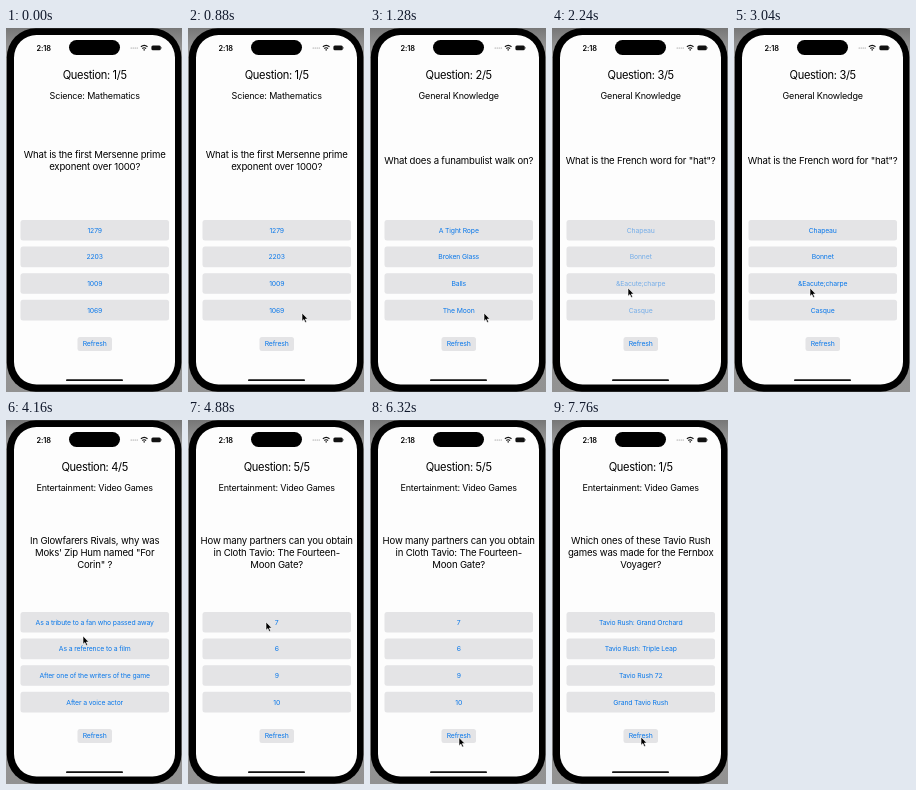
Animation, 176 px wide and 364 px high, one loop 8 s. Source, as an HTML page:

```html
<!DOCTYPE html>
<html lang="en">
<head>
<meta charset="utf-8">
<title>Quiz</title>
<style>
  html, body { margin: 0; width: 100%; height: 100%; overflow: hidden; background: #8e8e8e; }
  svg { display: block; width: 176px; height: 364px; }
  text { font-family: Inter, Roboto, sans-serif; text-anchor: middle; letter-spacing: -.02em; fill: #000; }
  .title { font-size: 11.1px; letter-spacing: -.03em; }
  .topic { font-size: 9px; }
  .ask { font-size: 9.6px; }
  .label { font-size: 6.85px; fill: #0a78ea; }
  .clock { font-size: 7.4px; font-weight: 600; }
  .key { fill: #e4e4e6; }
</style>
</head>
<body>
<svg id="stage" viewBox="0 0 176 364">
  <defs>
    <linearGradient id="wall" x2="0" y2="1">
      <stop offset="0" stop-color="#777"/>
      <stop offset=".08" stop-color="#a2a2a2"/>
      <stop offset="1" stop-color="#929292"/>
    </linearGradient>
  </defs>
  <rect width="176" height="364" fill="url(#wall)"/>
  <rect x=".8" y=".3" width="174.6" height="363.4" rx="29"/>
  <rect x="8" y="7" width="161" height="349.5" rx="22.5" fill="#fdfdfd"/>
  <rect x="63" y="12" width="51" height="15" rx="7.5"/>
  <text class="clock" x="37.7" y="22.5">2:18</text>
  <g fill="#888">
    <circle cx="125.2" cy="20" r=".6"/><circle cx="127.2" cy="20" r=".6"/>
    <circle cx="129.2" cy="20" r=".6"/><circle cx="131.2" cy="20" r=".6"/>
  </g>
  <g fill="none" stroke="#111" stroke-width="1.2">
    <path d="M134.9 18.8q3.3-2.7 6.6 0M136.3 20.5q1.9-1.5 3.8 0"/>
    <path d="M138.2 21.3v1.2" stroke-width="1.4"/>
  </g>
  <rect x="145.4" y="17.4" width="9.4" height="4.9" rx="1.5" fill="#111"/>
  <rect x="155.3" y="19" width=".7" height="1.7" fill="#777"/>
  <rect x="60" y="351.2" width="57" height="1.9" rx=".95" fill="#111"/>
  <g id="screen"></g>
  <path id="cursor" d="M0 0V8.2L1.9 6.5 3.2 9.5 4.6 8.9 3.3 6H5.8Z" stroke="#fff" stroke-width=".6" stroke-linejoin="round"/>
</svg>
<script>
const LOOP = 8000, STEP = 80, MID = 88.7, LINE = 12.2;
const FADE_OPACITY = 0.5, PRESS_OPACITY = 0.3, REFRESH = 4;

const games = "Entertainment: Video Games";
const general = "General Knowledge";
const rounds = [
  { at: 0, number: 1, topic: "Science: Mathematics",
    ask: ["What is the first Mersenne prime", "exponent over 1000?"],
    answers: ["1279", "2203", "1009", "1069"] },
  { at: 1120, number: 2, topic: general,
    ask: ["What does a funambulist walk on?"],
    answers: ["A Tight Rope", "Broken Glass", "Balls", "The Moon"] },
  { at: 2240, number: 3, topic: general,
    ask: ['What is the French word for "hat"?'],
    answers: ["Chapeau", "Bonnet", "&Eacute;charpe", "Casque"] },
  { at: 3680, number: 4, topic: games,
    ask: ["In Glowfarers Rivals, why was", "Moks' Zip Hum named \"For", 'Corin" ?'],
    answers: ["As a tribute to a fan who passed away", "As a reference to a film",
      "After one of the writers of the game", "After a voice actor"] },
  { at: 4800, number: 5, topic: games,
    ask: ["How many partners can you obtain", "in Cloth Tavio: The Fourteen-", "Moon Gate?"],
    answers: ["7", "6", "9", "10"] },
  { at: 7680, number: 1, topic: games,
    ask: ["Which ones of these Tavio Rush", "games was made for the Fernbox", "Voyager?"],
    answers: ["Tavio Rush: Grand Orchard", "Tavio Rush: Triple Leap", "Tavio Rush 72", "Grand Tavio Rush"] }
];

const presses = [
  { from: 960, to: 1120, button: 3 },
  { from: 2080, to: 2240, button: 2 },
  { from: 3440, to: 3600, button: 2 },
  { from: 4720, to: 4800, button: 0 },
  { from: 7360, to: 7520, button: REFRESH }
];

// time, x, y of the pointer tip
const path = [
  [560, 104, 345], [880, 114, 285], [1520, 114, 285], [2000, 76, 260],
  [3680, 76, 260], [4000, 76, 270], [4160, 77, 216], [4560, 78, 202],
  [5120, 78, 202], [5440, 60, 232], [5600, 60, 232], [6000, 86, 332],
  [6240, 89, 317.5], [6480, 89, 317.5], [6560, 89, 317]
];

const screen = document.getElementById("screen");
const cursor = document.getElementById("cursor");

function add(tag, attributes) {
  const node = document.createElementNS("http://www.w3.org/2000/svg", tag);
  for (const name in attributes) node.setAttribute(name, attributes[name]);
  return screen.appendChild(node);
}

const addText = (kind, y) => add("text", { class: kind, x: MID, y });

function addButton(x, y, width, height) {
  add("rect", { class: "key", x, y, width, height, rx: 2.5 });
  return addText("label", y + height / 2 + 2.4);
}

const title = addText("title", 51);
const topic = addText("topic", 71);
const lines = [0, 1, 2].map(() => addText("ask", 136));
const labels = [0, 1, 2, 3].map(i => addButton(14.5, 192 + i * 26.6, 148.5, 20.6));
labels.push(addButton(71.5, 309, 34.5, 14));
labels[REFRESH].textContent = "Refresh";

function pointerAt(time) {
  const next = path.findIndex(key => key[0] > time);
  if (next === 0) return null;
  if (next < 0) return path[path.length - 1].slice(1);
  const [t0, x0, y0] = path[next - 1], [t1, x1, y1] = path[next];
  const u = (time - t0) / (t1 - t0), eased = u * u * (3 - 2 * u);
  return [x0 + (x1 - x0) * eased, y0 + (y1 - y0) * eased];
}

let shown = null;
function showRound(round) {
  if (round === shown) return;
  shown = round;
  title.textContent = `Question: ${round.number}/5`;
  topic.textContent = round.topic;
  lines.forEach((line, i) => {
    line.textContent = round.ask[i] || "";
    line.setAttribute("y", 136 + (i - (round.ask.length - 1) / 2) * LINE);
  });
  round.answers.forEach((answer, i) => { labels[i].textContent = answer; });
}

function render(time) {
  const round = rounds.filter(item => item.at <= time).pop();
  showRound(round);
  const press = presses.find(item => time >= item.from && time < item.to);
  const fading = round.at > 0 && time < round.at + STEP;
  labels.forEach((label, i) => {
    const opacity = press && press.button === i ? PRESS_OPACITY
      : fading && i !== REFRESH ? FADE_OPACITY : 1;
    label.setAttribute("opacity", opacity);
  });
  const tip = pointerAt(time);
  cursor.setAttribute("visibility", tip ? "visible" : "hidden");
  if (tip) cursor.setAttribute("transform", `translate(${tip})`);
}

const start = performance.now();
function tick() {
  const elapsed = (performance.now() - start) % LOOP;
  render(Math.floor(elapsed / STEP) * STEP);
  requestAnimationFrame(tick);
}
tick();
</script>
</body>
</html>
```
